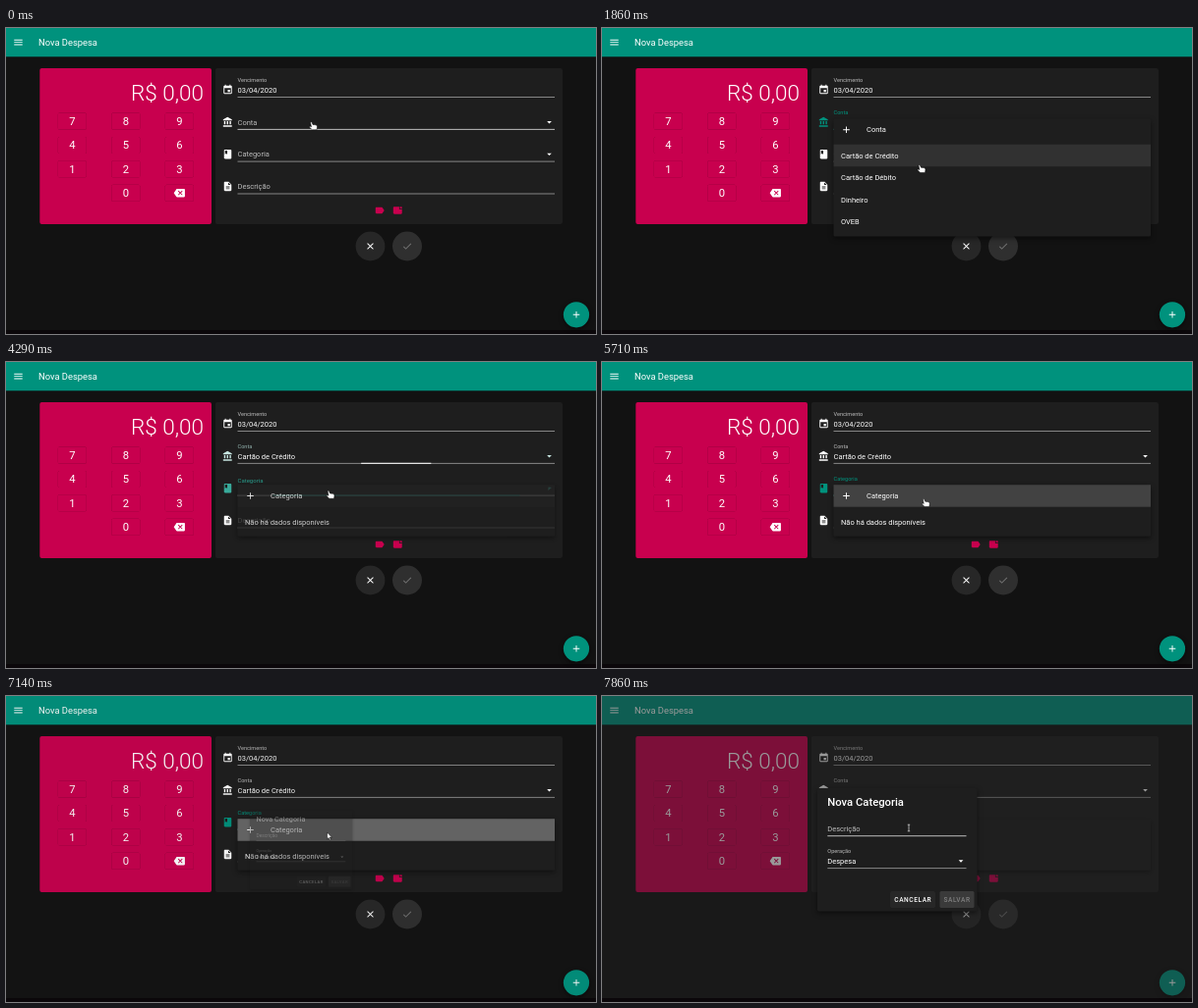
Animation, 600 px wide and 312 px high, one loop 8000 ms. Source, as an HTML page:

```html
<!DOCTYPE html>
<html lang="pt-BR">
<head>
<meta charset="utf-8">
<title>Nova Despesa</title>
<style>
html, body { margin: 0; width: 100%; height: 100%; overflow: hidden; background: #121212; }
svg { display: block; width: 100vw; height: 100vh; font: 7.5px Roboto, sans-serif; fill: #fff; }
.small { font-size: 5.625px; }
.dim { fill: #bcbcbc; }
.line { stroke: #b4b4b4; stroke-width: .7; }
.bright { stroke: #fff; }
.raised { filter: drop-shadow(0 .7px .6px rgba(0, 0, 0, .45)); }
.floating { filter: drop-shadow(0 2px 2.5px rgba(0, 0, 0, .5)); }
.button { font-size: 6.56px; font-weight: 500; letter-spacing: .0892em; text-anchor: middle; }
</style>
</head>
<body>
<svg id="stage" viewBox="0 0 600 312"></svg>
<script>
const TEAL = '#00927d', PINK = '#c8004e', SURFACE = '#1e1e1e';
const LOOP = 8000, FPS = 7;
const LEFT = 235.5, RIGHT = 558, MIDDLE = (LEFT + RIGHT) / 2, ITEM = 22.5;

const ICONS = {
  menu: 'M3 18h18v-2H3v2zm0-5h18v-2H3v2zm0-7v2h18V6H3z',
  event: 'M17 12h-5v5h5v-5zM16 1v2H8V1H6v2H5c-1.11 0-1.99.9-1.99 2L3 19c0 1.1.89 2 2 2h14c1.1 0 2-.9 2-2V5c0-1.1-.9-2-2-2h-1V1h-2zm3 18H5V8h14v11z',
  bank: 'M4 10v7h3v-7H4zm6 0v7h3v-7h-3zM2 22h19v-3H2v3zm14-12v7h3v-7h-3zm-4.5-9L2 6v2h19V6l-9.5-5z',
  book: 'M18 2H6c-1.1 0-2 .9-2 2v16c0 1.1.9 2 2 2h12c1.1 0 2-.9 2-2V4c0-1.1-.9-2-2-2zM6 4h5v8l-2.5-1.5L6 12V4z',
  page: 'M14 2H6c-1.1 0-2 .9-2 2v16c0 1.1.9 2 2 2h12c1.1 0 2-.9 2-2V8l-6-6zm2 16H8v-2h8v2zm0-4H8v-2h8v2zm-3-5V3.5L18.5 9H13z',
  close: 'M19 6.41L17.59 5 12 10.59 6.41 5 5 6.41 10.59 12 5 17.59 6.41 19 12 13.41 17.59 19 19 17.59 13.41 12z',
  check: 'M9 16.17L4.83 12l-1.42 1.41L9 19 21 7l-1.41-1.41z',
  add: 'M19 13h-6v6h-2v-6H5v-2h6V5h2v6h6v2z',
  erase: 'M22 3H7c-.69 0-1.23.35-1.59.88L0 12l5.41 8.11c.36.53.9.89 1.59.89h15c1.1 0 2-.9 2-2V5c0-1.1-.9-2-2-2zm-3 12.59L17.59 17 14 13.41 10.41 17 9 15.59 12.59 12 9 8.41 10.41 7 14 10.59 17.59 7 19 8.41 15.41 12 19 15.59z',
  label: 'M17.63 5.84C17.27 5.33 16.67 5 16 5H5c-1.1 0-2 .9-2 2v10c0 1.1.9 2 2 2h11c.67 0 1.27-.33 1.63-.84L22 12z',
  note: 'M4 4h11v6h6v8c0 1.1-.9 2-2 2H4c-1.1 0-2-.9-2-2V6c0-1.1.9-2 2-2zM16.5 4H19c1.1 0 2 .9 2 2v2.500h-4.500z',
  caret: 'M7 10l5 5 5-5z'
};

// Markup helpers
const icon = (name, x, y, extra = '', size = 11.25) =>
  `<g transform="translate(${x} ${y}) scale(${size / 24})"><path ${extra} d="${ICONS[name]}" transform="translate(-12 -12)"/></g>`;
const text = (x, y, content, extra = '') => `<text x="${x}" y="${y}" ${extra}>${content}</text>`;
const rect = (x, y, w, h, fill, extra = '') =>
  `<rect x="${x}" y="${y}" width="${w}" height="${h}" fill="${fill}" ${extra}/>`;
const line = (x1, x2, y, extra = 'class="line"') => `<path d="M${x1} ${y}H${x2}" ${extra}/>`;
const disc = (x, y, r, fill, extra = '') => `<circle cx="${x}" cy="${y}" r="${r}" fill="${fill}" ${extra}/>`;

const key = (label, i) => {
  const x = 67.3 + i % 3 * 54.5, y = 95 + Math.floor(i / 3) * 24.4;
  if (!label) return '';
  return rect(x - 14.5, y - 8.5, 29, 17, PINK, 'rx="1.5" class="raised"') +
    (label === '<' ? icon('erase', x, y) : text(x, y + 4, label, 'font-size="11.25" text-anchor="middle"'));
};

const select = (id, title, y, glyph) =>
  `<g id="${id}Icon">${icon(glyph, 225.5, y)}</g>
  <text id="${id}Label" x="${LEFT}">${title}</text>
  ${line(LEFT, RIGHT, y + 7.4, `class="line" id="${id}Line"`)}
  <path id="${id}Focus" stroke-width="1"/>
  <g id="${id}Caret">${icon('caret', 552.5, y)}</g>`;

const menu = (id, title, y, items, target) => {
  const rowTop = i => i ? y + 26.3 + (i - 1) * ITEM : y;
  const top = rowTop(target), height = 30 + items.length * ITEM;
  const row = i => rect(LEFT, rowTop(i), RIGHT - LEFT, ITEM, '#fff', `id="${id}Hover${i}" opacity="0"`);
  return `<g id="${id}Menu" class="floating">
    ${rect(LEFT, y, RIGHT - LEFT, height, SURFACE, 'rx="1.5"')}
    ${row(0)}${row(1)}
    <clipPath id="${id}Clip">${rect(LEFT, top, RIGHT - LEFT, ITEM, '#fff')}</clipPath>
    <g clip-path="url(#${id}Clip)"><circle id="${id}Ripple"/></g>
    ${icon('add', 248.5, y + 11.3)}${text(269, y + 14, title)}
    ${items.map((item, i) => text(243, rowTop(i + 1) + 14.2, item)).join('')}
  </g>`;
};

const stage = document.getElementById('stage');
stage.innerHTML = `
  ${rect(0, 0, 600, 312, '#121212')}
  ${rect(0, 0, 600, 29.3, TEAL, 'class="raised"')}
  ${icon('menu', 12.5, 14.6)}${text(33, 18, 'Nova Despesa', 'font-size="9.375"')}

  ${rect(34.3, 41, 174.700, 159, PINK, 'rx="2" class="raised"')}
  ${text(201, 74, 'R$ 0,00', 'font-size="22.5" font-weight="300" text-anchor="end"')}
  ${['7', '8', '9', '4', '5', '6', '1', '2', '3', '', '0', '<'].map(key).join('')}

  ${rect(212.7, 41, 353.300, 159, SURFACE, 'rx="2" class="raised"')}
  ${icon('event', 225.5, 63)}
  ${text(LEFT, 55, 'Vencimento', 'class="small dim"')}${text(LEFT, 65.8, '03/04/2020')}
  ${line(LEFT, RIGHT, 70.5)}
  ${select('account', 'Conta', 96, 'bank')}
  ${text(LEFT, 98.7, 'Cartão de Crédito', 'id="accountValue"')}
  ${select('category', 'Categoria', 128.7, 'book')}
  ${icon('page', 225.5, 161.5)}${text(LEFT, 164.2, 'Descrição', 'class="dim"')}${line(LEFT, RIGHT, 169)}
  ${icon('label', 380, 186, `fill="${PINK}"`)}${icon('note', 398.5, 186, `fill="${PINK}"`)}

  ${disc(370.5, 222.5, 15, '#272727', 'class="raised"')}${icon('close', 370.5, 222.5)}
  ${disc(408, 222.5, 15, '#2f2f2f')}${icon('check', 408, 222.5, 'fill="#747474"')}
  ${rect(0, 308, 600, 4, '#0b070a')}
  ${disc(580, 292.3, 13.1, TEAL, 'class="floating"')}${icon('add', 580, 292.3)}

  ${menu('account', 'Conta', 92.4, ['Cartão de Crédito', 'Cartão de Débito', 'Dinheiro', 'OVEB'], 1)}
  ${menu('category', 'Categoria', 125.2, ['Não há dados disponíveis'], 0)}

  ${rect(0, 0, 600, 308, '#212121', 'id="overlay"')}
  <g id="dialog" class="floating">
    ${rect(219, 94, 162.500, 125.500, SURFACE, 'rx="2"')}
    ${text(229.3, 111.7, 'Nova Categoria', 'font-size="11.25" font-weight="500"')}
    ${text(229.3, 137.7, 'Descrição', 'class="dim"')}${line(229.3, 370.5, 142.7, 'class="line" id="nameLine"')}
    ${text(229.3, 160.3, 'Operação', 'class="small dim"')}${text(229.3, 170.8, 'Despesa')}
    ${icon('caret', 365, 168.3)}${line(229.3, 370.5, 175.6)}
    ${rect(293, 199, 46, 17, '#272727', 'rx="1.5" class="raised"')}${text(316.3, 210, 'CANCELAR', 'class="button"')}
    ${rect(343.5, 199, 35, 17, '#3a3a3a', 'rx="1.5"')}${text(361, 210, 'SALVAR', 'class="button" fill="#808080"')}
  </g>

  <g id="cursor" stroke="#000" stroke-width=".5" stroke-linejoin="round">
    <path id="hand" d="M-1 .6Q-.3-.3.5.6L1.500 3L4.500 3.300Q6.200 3.700 6 5.200L5.600 8.200H.8L-2 5.600Q-2.200 4.500-1 4.700L0 5.200Z"/>
    <path id="arrow" d="M0 0V7L1.600 5.500L2.700 7.900L3.800 7.400L2.700 5.100H4.900Z"/>
    <path id="beam" d="M-1.200-3.300H1.200M0-3.300V3.300M-1.200 3.300H1.200" stroke="#e8e8e8" stroke-width=".7"/>
  </g>`;

const set = (id, attributes) => {
  const node = document.getElementById(id);
  for (const name in attributes) node.setAttribute(name, attributes[name]);
};

// Motion helpers
const clamp = x => Math.min(1, Math.max(0, x));
const lerp = (a, b, p) => a + (b - a) * p;
const bezier = (x1, y1, x2, y2) => x => {
  if (x <= 0 || x >= 1) return clamp(x);
  const at = (a, b, s) => 3 * (1 - s) ** 2 * s * a + 3 * (1 - s) * s * s * b + s ** 3;
  let low = 0, high = 1;
  for (let i = 0; i < 24; i++) {
    const s = (low + high) / 2;
    if (at(x1, x2, s) < x) low = s; else high = s;
  }
  return at(y1, y2, low);
};
const swift = bezier(.25, .8, .5, 1), decelerate = bezier(0, 0, .2, 1);
const since = (t, start, duration = 300, curve = swift) => curve((t - start) / duration);
const pulse = (t, start, end) => since(t, start) * (1 - since(t, end));
const tint = (gray, p) => `rgb(${[0, 146, 125].map(c => Math.round(lerp(gray, c, p)))})`;

// Pointer tip: time, x, y
const PATH = [
  [1143, 310.5, 95.5], [1290, 311.5, 98], [1860, 323, 139.5], [2143, 328, 138.5], [2290, 328, 138.5],
  [2571, 330, 135], [4143, 330, 135], [4286, 328, 131], [5000, 328, 131], [5143, 328, 139.5],
  [5571, 328, 139.5], [5857, 326.5, 139], [7150, 326.5, 139], [7857, 312, 134.5]
];
const pointer = t => {
  const next = PATH.findIndex(point => point[0] > t);
  if (next === 0) return PATH[0].slice(1);
  if (next < 0) return PATH[PATH.length - 1].slice(1);
  const [a, b] = [PATH[next - 1], PATH[next]];
  const p = (t - a[0]) / (b[0] - a[0]);
  return [lerp(a[1], b[1], p), lerp(a[2], b[2], p)];
};

const drawSelect = (id, y, t, { focus, blur, open, close, hovered }) => {
  const active = pulse(t, focus, blur), raised = since(t, open);
  const reach = (RIGHT - LEFT) / 2 * active;
  set(id + 'Icon', { fill: tint(255, active) });
  set(id + 'Label', { y: lerp(y + 2.7, y - 7.8, raised), 'font-size': lerp(7.5, 5.625, raised), fill: tint(188, active) });
  set(id + 'Line', { class: hovered ? 'line bright' : 'line' });
  set(id + 'Focus', {
    d: `M${MIDDLE - reach} ${y + 7.3}H${MIDDLE + reach}`,
    stroke: t < blur ? TEAL : '#fff', opacity: active > 0 ? 1 : 0
  });
  set(id + 'Caret', { fill: tint(255, active), transform: `rotate(${180 * pulse(t, open, close)} 552.5 ${y})` });
  set(id + 'Menu', { opacity: pulse(t, open, close) });
};

const drawRipple = (id, t, start, end, [x, y], rowMiddle) => {
  const p = since(t, start, 250, decelerate);
  set(id + 'Ripple', {
    cx: lerp(x, MIDDLE, p), cy: lerp(y, rowMiddle, p), r: 162 * lerp(.3, 1, p),
    opacity: .2 * clamp((t - start) / 100) * (1 - since(t, end))
  });
};

const draw = t => {
  drawSelect('account', 96, t, { focus: 60, blur: 4170, open: 200, close: 3050, hovered: t < 1400 });
  drawSelect('category', 128.7, t, { focus: 4170, blur: LOOP * 2, open: 4170, close: LOOP * 2, hovered: t > 3300 });
  set('accountValue', { opacity: t > 3050 ? 1 : 0 });

  set('accountHover0', { opacity: .15 * pulse(t, 230, 1500) });
  set('accountHover1', { opacity: .15 * pulse(t, 1790, 3100) });
  set('categoryHover0', { opacity: .16 * pulse(t, 4270, 7140) });
  drawRipple('account', t, 2763, 3050, [330, 135], 130);
  drawRipple('category', t, 6848, 7200, [326.5, 139], 136.5);

  const shown = since(t, 7113);
  set('overlay', { opacity: .46 * since(t, 7130) });
  set('dialog', {
    opacity: shown,
    transform: `translate(300 156.5) scale(${lerp(.5, 1, shown)}) translate(-300 -156.5)`
  });
  set('nameLine', { class: t > 7600 ? 'line bright' : 'line' });

  const shape = t < 7100 ? 'hand' : t < 7700 ? 'arrow' : 'beam';
  for (const id of ['hand', 'arrow', 'beam']) set(id, { opacity: id === shape ? 1 : 0 });
  set('cursor', { transform: `translate(${pointer(t)})` });
};

// The screen refreshes seven times a second.
const started = performance.now();
const tick = () => {
  const elapsed = (performance.now() - started) % LOOP;
  draw(Math.floor((elapsed + 5) * FPS / 1000) * 1000 / FPS % LOOP);
  requestAnimationFrame(tick);
};
tick();
</script>
</body>
</html>
```
